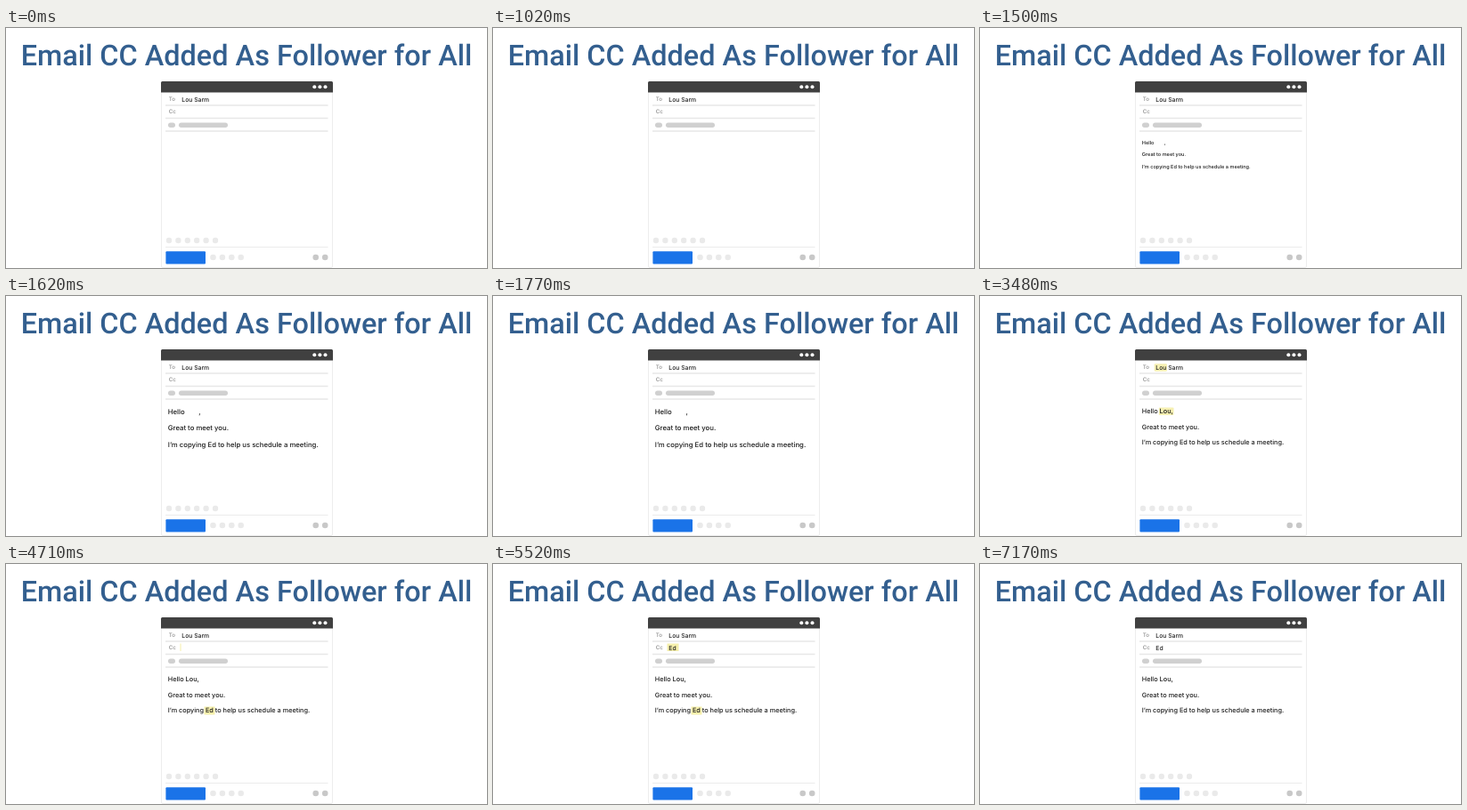
An HTML page that plays this animation: 540 px wide and 270 px high, repeating every 7.2 s.

```html
<!DOCTYPE html>
<html lang="en">
<head>
<meta charset="utf-8">
<title>Email CC</title>
<style>
  html, body { margin: 0; width: 100%; height: 100%; overflow: hidden; background: #fff; }
  svg { display: block; width: 540px; height: 270px; }
  text { font: 500 7.3px Inter, "Open Sans", sans-serif; fill: #1c1c1c; text-rendering: geometricPrecision; white-space: pre; }
  .title { font: 500 32.4px Roboto, sans-serif; fill: #335f8f; text-anchor: middle; }
  .field { font-size: 6.8px; }
  .label { font-size: 6.2px; fill: #8c8c8c; }
  .mark { fill: #f5efab; }
  .rule { stroke: #e8e8e8; stroke-width: 1.3; }
  .thin { stroke: #ececec; stroke-width: 1; }
</style>
</head>
<body>
<svg viewBox="0 0 540 270">
  <text class="title" x="270" y="41.8">Email CC Added As Follower for All</text>

  <rect x="174.5" y="60.5" width="192" height="209" rx="1.5" fill="#fff" stroke="#ededed"/>
  <path d="M174 72.6V61.5Q174 60 175.5 60H365.5Q367 60 367 61.5V72.6Z" fill="#404040"/>
  <path class="rule" d="M179 87H361.5M179 101.5H361.5M179 116H361.5"/>
  <path class="thin" d="M179 246.5H361.5"/>
  <g fill="#d0d0d0">
    <rect x="182" y="106.5" width="8" height="5.4" rx="2.7"/>
    <rect x="194" y="106.5" width="55" height="5.4" rx="2.7"/>
  </g>
  <rect x="179.4" y="251.3" width="44.6" height="14.1" rx="1" fill="#1a73e8"/>
  <g id="dots"></g>

  <rect class="mark" id="toMark" x="195.7" y="76.2" width="14.2" height="8.6" rx="1"/>
  <rect class="mark" id="ccMark" x="195.5" y="89.5" width="13" height="8.5"/>
  <rect class="mark" id="helloMark" x="200.8" y="125.5" width="16.7" height="8.6" rx="1"/>
  <rect class="mark" id="bodyMark" x="222.5" y="160.5" width="12" height="9"/>

  <text class="label" x="182.7" y="82.4">To</text>
  <text class="label" x="182.7" y="96.4">Cc</text>
  <text class="field" x="197.3" y="82.6">Lou Sarm</text>
  <text class="field" id="ccName" x="197.3" y="96.6">Ed</text>

  <text id="shortcut" x="182" y="132.2"></text>
  <g id="message">
    <text x="181.8" y="132.2">Hello</text>
    <text x="214.4" y="132.2">,</text>
    <text x="181.8" y="149.7">Great to meet you.</text>
    <text x="181.8" y="167.3">I’m copying Ed to help us schedule a meeting.</text>
  </g>
  <text id="helloName" x="201.6" y="132.2">Lou</text>
</svg>
<script>
const LOOP = 7200;
const SHORTCUT = '/intro';
const $ = id => document.getElementById(id);

function dotRow(count, x, y, gap, r, fill) {
  for (let i = 0; i < count; i++) {
    const dot = document.createElementNS('http://www.w3.org/2000/svg', 'circle');
    const attrs = { cx: x + i * gap, cy: y, r, fill };
    for (const key in attrs) dot.setAttribute(key, attrs[key]);
    $('dots').append(dot);
  }
}
dotRow(3, 346.3, 66.3, 6.1, 2, '#fff');
dotRow(6, 183, 239, 10.4, 3.2, '#eaeaea');
dotRow(4, 232.5, 258, 10.4, 3.3, '#eaeaea');
dotRow(2, 347.7, 258, 10.5, 3.3, '#c8c8c8');

const progress = (t, start, end) => Math.min(1, Math.max(0, (t - start) / (end - start)));
const ease = p => 0.5 - 0.5 * Math.cos(Math.PI * p);

// Grows from nothing to 110 %, then settles at full size.
function pop(t, start, end) {
  const peak = start + (end - start) * 0.685;
  return 1.1 * ease(progress(t, start, peak)) - 0.1 * ease(progress(t, peak, end));
}

function scaleAbout(id, x, y, s) {
  $(id).setAttribute('transform', `translate(${x} ${y}) scale(${s}) translate(${-x} ${-y})`);
  $(id).style.visibility = s > 0 ? 'visible' : 'hidden';
}

function fade(id, t, inStart, inEnd, outStart, outEnd) {
  $(id).style.opacity = progress(t, inStart, inEnd) - progress(t, outStart, outEnd);
}

function draw(t) {
  const typed = t < 60 ? 0 : Math.floor((t - 60) / 72) + 1;
  $('shortcut').textContent = SHORTCUT.slice(0, typed);
  $('shortcut').style.opacity = 1 - progress(t, 840, 1020);

  scaleAbout('message', 182, 126, pop(t, 1200, 1900));

  fade('toMark', t, 2100, 2250, 3460, 3730);
  fade('helloMark', t, 2550, 2700, 3460, 3730);
  scaleAbout('helloName', 208, 130, pop(t, 2850, 3300));

  fade('bodyMark', t, 4170, 4320, 6010, 6280);
  $('ccMark').setAttribute('width', 13 * progress(t, 4680, 5070));
  fade('ccMark', t, 4670, 4680, 6010, 6280);
  scaleAbout('ccName', 201.5, 94, pop(t, 5070, 5520));
}

const begin = performance.now();
function tick() {
  draw((performance.now() - begin) % LOOP);
  requestAnimationFrame(tick);
}
tick();
</script>
</body>
</html>
```
